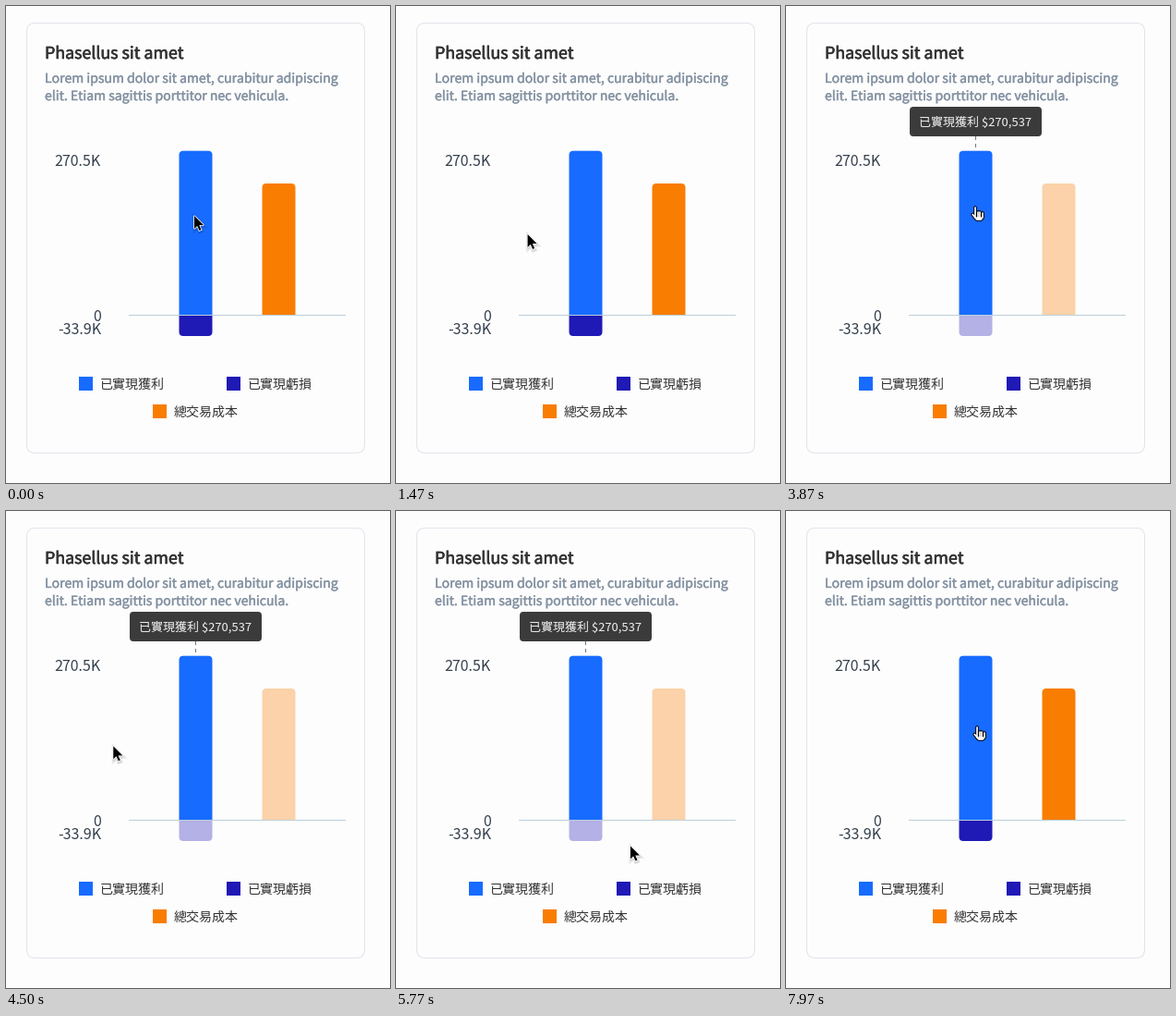
Write a matplotlib script that moves like this. It is 416 by 516 pixels and loops after 8 s.

```python
import numpy as np
import matplotlib.pyplot as plt
from matplotlib.animation import FuncAnimation
from matplotlib.patches import FancyBboxPatch, Rectangle
from matplotlib.patheffects import withStroke
from matplotlib.transforms import Affine2D

W, H, DPI = 416, 516, 64
FRAMES, INTERVAL = 250, 32
PT = 72 / DPI

BG, BLUE, NAVY, ORANGE = "#fdfdfd", "#176bff", "#1f19b5", "#f97d00"
INK, LABEL, MUTED, TIP = "#333333", "#36414e", "#8593a3", "#3b3b3b"
ZERO = 334
BAR_WIDTH, BAR_LEFT, BAR_STEP = 36, 187.5, 90
DIM = 0.33
SELECT, DESELECT = 2870, 6970

# Eased pointer moves: start and end in ms, then where the tip arrives
POINTER_START = np.array([204, 227])
MOVES = [
    (30, 1470, (142.5, 247)),
    (1470, 2100, (237, 225.5)),
    (2630, 2860, (205, 216.5)),
    (3870, 4500, (116, 254.5)),
    (4830, 5770, (254, 362.5)),
    (5770, 6500, (207, 232.5)),
]

fig = plt.figure(figsize=(W / DPI, H / DPI), dpi=DPI, facecolor=BG)
ax = fig.add_axes([0, 0, 1, 1])
ax.set_xlim(0, W)
ax.set_ylim(H, 0)
ax.axis("off")


def rect(x, y, width, height, color):
    return ax.add_patch(Rectangle((x, y), width, height, fc=color, lw=0))


def rounded(x, y, width, height, radius, **style):
    box = FancyBboxPatch((x, y), width, height, **style,
                         boxstyle=f"round,pad=0,rounding_size={radius}")
    return ax.add_patch(box)


def bar(column, value_y, color):
    """Bar from the zero line to value_y, rounded only at its value end."""
    x = BAR_LEFT + column * BAR_STEP
    top, bottom = sorted((value_y, ZERO))
    extra = 10
    hidden_above = extra if top == ZERO else 0
    shape = rounded(x, top - hidden_above, BAR_WIDTH, bottom - top + extra, 4.5,
                    fc=color, lw=0)
    shape.set_clip_path(Rectangle((0, top - 1 + hidden_above / extra), W,
                                  bottom - top + 1, transform=ax.transData))
    return shape


def write(x, y, text, px, color, heavy=0, **kw):
    label = ax.text(x, y, text, fontsize=px * PT, color=color,
                    family="Noto Sans CJK JP", va="baseline", **kw)
    if heavy:
        label.set_path_effects([withStroke(linewidth=heavy * PT, foreground=color)])
    return label


def smooth(t, start, end):
    u = np.clip((t - start) / (end - start), 0, 1)
    return u * u * (3 - 2 * u)


rounded(22.5, 18.5, 366, 465, 9, fc=BG, ec="#e3e3ec", lw=PT)
write(42, 57, "Phasellus sit amet", 17.8, INK, 0.6)
write(42, 83, "Lorem ipsum dolor sit amet, curabitur adipiscing", 14, MUTED, 0.4)
write(42, 102, "elit. Etiam sagittis porttitor nec vehicula.", 14, MUTED, 0.4)

for y, text in ((173, "270.5K"), (341, "0"), (355, "-33.9K")):
    write(103, y, text, 16, LABEL, ha="right")

profit = bar(0, 156.7, BLUE)
loss = bar(0, 357, NAVY)
cost = bar(1, 192, ORANGE)
rect(133, ZERO, 235, 1, "#bccfd9")

for x, y, color, text in ((79, 401, BLUE, "已實現獲利"),
                          (239, 401, NAVY, "已實現虧損"),
                          (159, 431, ORANGE, "總交易成本")):
    rect(x, y, 15, 15, color)
    write(x + 22.5, y + 12.5, text, 14, INK)

tooltip = [rounded(134, 109, 143, 32, 4, fc=TIP, lw=0, zorder=4),
           write(144, 129.5, "已實現獲利 $270,537", 13, "#f0f0f0", zorder=5)]
tooltip += [rect(205, y, 1, 4, "#777777") for y in (141, 149)]

# Pointer artists are drawn around their tip and moved by one transform
pointer_shift = Affine2D()
pointer_space = pointer_shift + ax.transData


def make_arrow():
    size = 14
    x = np.array([0, 0, 0.23, 0.39, 0.54, 0.38, 0.72]) * size
    y = np.array([0, 1, 0.78, 1.14, 1.08, 0.72, 0.72]) * size
    parts = []
    for width in (4, 2.5):
        parts += ax.fill(x + 0.5, y + 1.5, fc="none", ec=(0, 0, 0, 0.08),
                         lw=width * PT, transform=pointer_space, zorder=8)
    parts += ax.fill(x, y, fc="black", ec="white", lw=1.6 * PT,
                     transform=pointer_space, zorder=9)
    parts += ax.fill(x, y, fc="black", lw=0, transform=pointer_space, zorder=10)
    return parts


def make_hand():
    """Round-capped strokes: a black layer, then a thinner white one on top."""
    index = ((0, 0), (1.3, 12))
    folded = [((x, x), (6.4 + 0.1 * x, 12)) for x in (2.6, 5.2, 7.6)]
    thumb = ((-2.8, 0.5), (9, 13))
    palm = ((1.8, 6), (13.2, 13.2))
    parts = []
    for color, border in (("black", 2), ("white", 0)):
        for x, y in [index, *folded, thumb, palm]:
            width = 3.6 if y == palm[1] else 1.7
            parts += ax.plot(x, y, color=color, lw=(width + border) * PT,
                             solid_capstyle="round", transform=pointer_space,
                             zorder=9 if border else 10)
    return parts


arrow, hand = make_arrow(), make_hand()
ax.set_xlim(0, W)
ax.set_ylim(H, 0)


def pointer_at(t):
    place = POINTER_START
    for start, end, goal in MOVES:
        place = place + (np.array(goal) - place) * smooth(t, start, end)
    return place


def draw(frame):
    t = frame * INTERVAL
    x, y = pointer_at(t)
    pointer_shift.clear().translate(x, y)

    dimmed = smooth(t, SELECT, SELECT + 300) - smooth(t, DESELECT, DESELECT + 450)
    for shape in (loss, cost):
        shape.set_alpha(1 - (1 - DIM) * dimmed)
    for part in tooltip:
        part.set_visible(SELECT <= t < DESELECT)

    over_bar = BAR_LEFT <= x <= BAR_LEFT + BAR_WIDTH and 157 <= y <= 357
    hovering = t > MOVES[2][0] and over_bar
    for part in hand:
        part.set_visible(hovering)
    for part in arrow:
        part.set_visible(not hovering)
    return []


anim = FuncAnimation(fig, draw, frames=FRAMES, interval=INTERVAL,
                     init_func=lambda: draw(0), repeat=True, repeat_delay=0)
plt.show()
```
